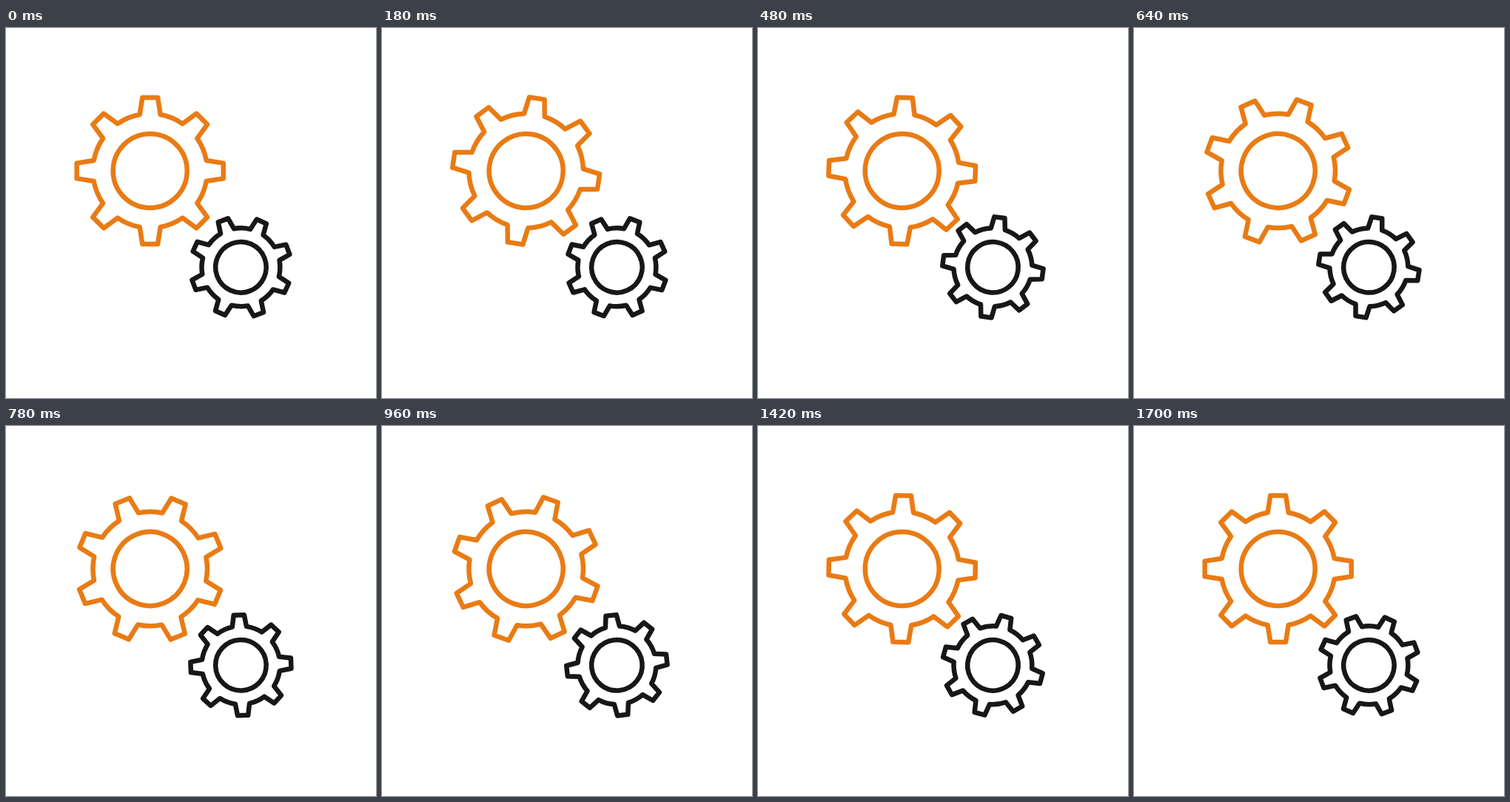
An HTML page for the animation above (1.72 s loop, 500x500 px).

```html
<!DOCTYPE html>
<html lang="en">
<head>
<meta charset="utf-8">
<title>Turning gears</title>
<style>
  html, body { margin: 0; width: 100%; height: 100%; overflow: hidden; background: #fff; }
  svg { display: block; width: 100vw; height: 100vh; }
  g { fill: none; stroke-width: 6.5; stroke-linejoin: round; }
</style>
</head>
<body>
<svg viewBox="0 0 500 500">
  <g id="large" stroke="#e97b14"></g>
  <g id="small" stroke="#17171a"></g>
</svg>
<script>
const LOOP = 1720, STEP = 20, TEETH = 8;

// Each gear swings to its peak angle, then settles back to rest.
// out and back hold the horizontal handles of the two easings.
const gears = [
  { id: 'large', x: 194.7, y: 193, scale: 1, start: 0,
    turnAt: 700, end: 1640, peak: 68, rest: 45, out: [0.4, 0.75], back: [0.54, 0.28] },
  { id: 'small', x: 317.4, y: 323.3, scale: 0.685, start: 24.3,
    turnAt: 1000, end: 1720, peak: -121, rest: -90, out: [0.71, 0.23], back: [0.75, 0.3] }
];

// cubic-bezier(a, 0, b, 1), solved by bisection
function ease(x, [a, b]) {
  let low = 0, high = 1;
  for (let i = 0; i < 30; i++) {
    const s = (low + high) / 2, w = 1 - s;
    if (3 * a * s * w * w + 3 * b * s * s * w + s ** 3 < x) low = s;
    else high = s;
  }
  return low * low * (3 - 2 * low);
}

function angleAt(t, { turnAt, end, peak, rest, out, back }) {
  if (t < turnAt) return peak * ease(t / turnAt, out);
  return peak + (rest - peak) * ease(Math.min(1, (t - turnAt) / (end - turnAt)), back);
}

// Point at a radius, offset sideways from a tooth's middle line
function point(tooth, side, radius, scale) {
  const a = tooth * 2 * Math.PI / TEETH, c = Math.cos(a) * scale, s = Math.sin(a) * scale;
  return `${side * c + radius * s} ${side * s - radius * c}`;
}

function gearPath(scale) {
  const root = 14, tip = 10.4, inner = 76, outer = 99;
  const r = Math.hypot(root, inner) * scale;
  let d = `M${point(0, -root, inner, scale)}`;
  for (let i = 0; i < TEETH; i++) {
    d += `L${point(i, -tip, outer, scale)}L${point(i, tip, outer, scale)}`
      + `L${point(i, root, inner, scale)}A${r} ${r} 0 0 1 ${point(i + 1, -root, inner, scale)}`;
  }
  return d + 'Z';
}

for (const gear of gears) {
  gear.node = document.getElementById(gear.id);
  gear.node.innerHTML = `<path d="${gearPath(gear.scale)}"/><circle r="${50 * gear.scale}"/>`;
}

function draw(time) {
  const t = Math.floor(time % LOOP / STEP) * STEP;
  for (const gear of gears) {
    const angle = gear.start + angleAt(t, gear);
    gear.node.setAttribute('transform', `translate(${gear.x} ${gear.y}) rotate(${angle})`);
  }
}

let origin;
function tick(now) {
  origin ??= now;
  draw(now - origin);
  requestAnimationFrame(tick);
}
draw(0);
requestAnimationFrame(tick);
</script>
</body>
</html>
```
